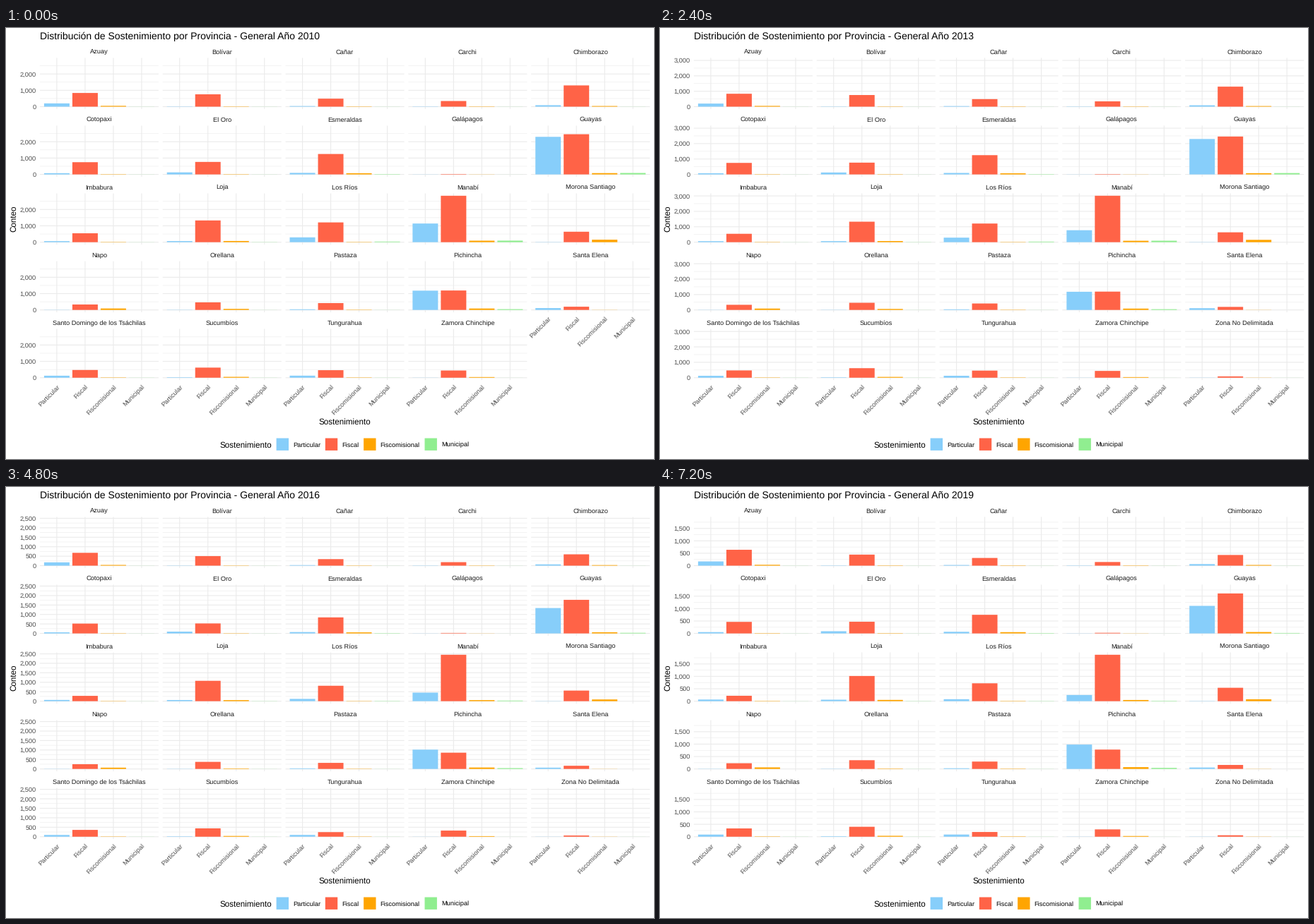
Recreate the animation shown at these times as a matplotlib script. Size 917 by 611 pixels, loop 8000 ms.

```python
import matplotlib.pyplot as plt
import numpy as np
from matplotlib.animation import FuncAnimation

plt.rcParams["font.family"] = "Liberation Sans"
plt.rcParams["text.hinting"] = "none"

W, H, DPI = 917, 611, 72          # at 72 dpi one point is one pixel
FIRST_YEAR, YEARS = 2010, 10
KEY_YEARS = [2010, 2012, 2015, 2016, 2018]

KINDS = ["Particular", "Fiscal", "Fiscomisional", "Municipal"]
COLORS = ["#87CEFA", "#FF6347", "#FFA500", "#90EE90"]
GRID, TICK, STRIP = "#EBEBEB", "#4D4D4D", "#1A1A1A"
SMALL, MEDIUM, LARGE = 9.31, 11.64, 13.97

# Panel geometry in pixels
LEFT, PANEL_W, STEP_X = 47.9, 168.0, 173.82
TOP, PANEL_H, STEP_Y = 42.4, 72.4, 96.06
COLS, ROWS = 5, 5
UNIT = PANEL_W / 4.2              # width of one category
BASE = PANEL_H * 1.05 / 1.1       # zero line below the panel top
RANGE = PANEL_H / 1.1             # height of the largest bar
CENTER_X = LEFT + (STEP_X * (COLS - 1) + PANEL_W) / 2
CENTER_Y = TOP + (STEP_Y * (ROWS - 1) + PANEL_H) / 2
LEGEND_Y, KEY, GAP = 590.2, 17.4, 5.82

provinces = []


def add(name, fiscal, private=15, mixed=18, municipal=5, since=FIRST_YEAR):
    provinces.append((name, (private, fiscal, mixed, municipal), since))


# A pair is the count before and after the reform, a single number the
# count before it, five numbers are the counts in the key years.
add("Azuay", (838, 640), (200, 170), 50)
add("Bolívar", (755, 445))
add("Cañar", (490, 310), 38)
add("Carchi", (345, 147))
add("Chimborazo", (1300, 430), 90, 40)
add("Cotopaxi", (748, 465), 76)
add("El Oro", (765, 470), 125)
add("Esmeraldas", (1250, 750), 95, 73, 20)
add("Galápagos", (25, 25), 7, 8, 2)
add("Guayas", (2460, 1610), (2300, 1110), 80, (88, 18))
add("Imbabura", (545, 218), (65, 67))
add("Loja", (1330, 1015), (68, 60), 73, 10)
add("Los Ríos", (1210, 720), (295, 80), municipal=(36, 8))
add("Manabí", (2841, 3098, 2841, 2452, 1870), (1142, 912, 506, 452, 250),
    (92, 48), (95, 15))
add("Morona Santiago", (640, 540), 13, (152, 76), 0)
add("Napo", (334, 230), 10, 90, 0)
add("Orellana", (465, 352), 12, (65, 15))
add("Pastaza", (420, 297), 40)
add("Pichincha", (1190, 780), (1180, 982), (88, 73), (48, 42))
add("Santa Elena", (198, 161), (115, 58), 8, 0)
add("Santo Domingo de los Tsáchilas", (472, 333), 122)
add("Sucumbíos", (618, 400), 26, 52)
add("Tungurahua", (460, 190), 125)
add("Zamora Chinchipe", (440, 295), 7, 40, 2)
add("Zona No Delimitada", (85, 58), 8, 9, 3, since=2012)


def count(spec, year):
    if np.size(spec) == len(KEY_YEARS):
        return np.interp(year, KEY_YEARS, spec)
    before, after = spec if np.size(spec) == 2 else (spec, 0.7 * spec)
    done = 1 / (1 + np.exp((2015.5 - year) / 0.35))
    return before + (after - before) * done


fig = plt.figure(figsize=((W + 0.001) / DPI, (H + 0.001) / DPI), dpi=DPI,
                 facecolor="white")
ax = fig.add_axes([0, 0, 1, 1])


def label(x, y, text, size=SMALL, color="black", ha="left", **kw):
    kw.setdefault("va", "baseline")
    ax.text(x, y, text, size=size, color=color, ha=ha, **kw)


def draw_grid(x0, y0, y_of, ticks, minor):
    right, bottom = x0 + PANEL_W, y0 + PANEL_H
    centers = x0 + UNIT * (np.arange(len(KINDS)) + 0.6)
    for marks, width in ((minor, 0.56), (ticks, 1.13)):
        ax.hlines(y0 + y_of(marks), x0, right, colors=GRID, lw=width,
                  snap=False, zorder=1)
    ax.vlines(centers, y0, bottom, colors=GRID, lw=1.13, snap=False, zorder=1)
    return centers


def draw_category_names(centers, y0):
    for x, kind in zip(centers, KINDS):
        label(x, y0 + PANEL_H + 5.2, kind, color=TICK, ha="right", va="top",
              rotation=45, rotation_mode="anchor")


def draw_legend():
    label(302.6, LEGEND_Y + 4.2, "Sostenimiento", MEDIUM)
    for x, kind, color in zip((382.6, 451.8, 506.1, 592.5), KINDS, COLORS):
        ax.add_patch(plt.Rectangle((x, LEGEND_Y - KEY / 2), KEY, KEY,
                                   fc=color, lw=0, snap=False))
        label(x + KEY + GAP + 0.4, LEGEND_Y + 3.3, kind)


def draw(i):
    year = FIRST_YEAR + i
    ax.clear()
    ax.set(xlim=(0, W), ylim=(H, 0))
    ax.axis("off")

    shown = [(name, np.array([count(s, year) for s in specs]))
             for name, specs, since in provinces if year >= since]
    peak = max(counts.max() for _, counts in shown)
    step = 1000 if peak > 2700 else 500
    limit = 1.05 * peak
    ticks = np.arange(0, limit, step)
    minor = np.arange(step / 2, limit, step)

    def y_of(v):
        return BASE - v / peak * RANGE

    for n, (name, counts) in enumerate(shown):
        row, col = divmod(n, COLS)
        x0, y0 = LEFT + col * STEP_X, TOP + row * STEP_Y
        centers = draw_grid(x0, y0, y_of, ticks, minor)
        ax.bar(centers, -counts / peak * RANGE, 0.9 * UNIT, bottom=y0 + BASE,
               color=COLORS, lw=0, snap=False, zorder=2)
        label(x0 + PANEL_W / 2, y0 - 5.9, name, color=STRIP, ha="center")
        if col == 0:
            for v in ticks:
                label(42.8, y0 + y_of(v) + 3.3, f"{v:,.0f}", color=TICK,
                      ha="right")
        # the lowest panel of each column carries the category names
        if n + COLS >= len(shown):
            draw_category_names(centers, y0)

    label(LEFT, 16, "Distribución de Sostenimiento por Provincia"
          f" - General Año {year}", LARGE)
    label(CENTER_X, 561.7, "Sostenimiento", MEDIUM, ha="center")
    label(14.2, CENTER_Y, "Conteo", MEDIUM, ha="center", rotation=90,
          rotation_mode="anchor")
    draw_legend()
    return []


anim = FuncAnimation(fig, draw, frames=YEARS, init_func=lambda: [],
                     interval=800, repeat=True, repeat_delay=0)
plt.show()
```
